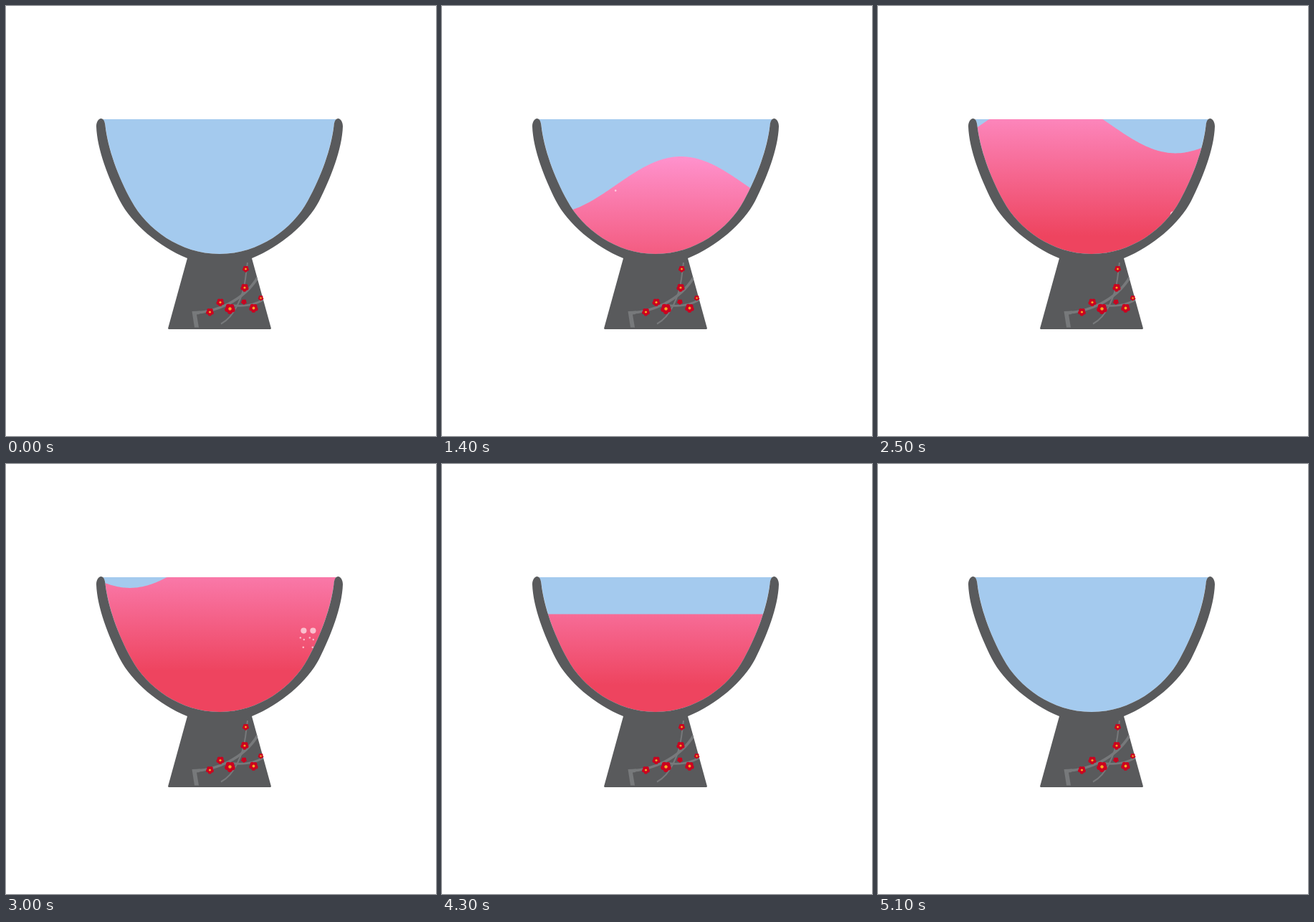
Write an HTML page with a canvas that moves like this. It is 600x600 px and loops after 5.2 s.

```html
<!DOCTYPE html>
<html lang="en">
<head>
<meta charset="utf-8">
<title>Filling bowl</title>
<style>
html, body { margin: 0; width: 100%; height: 100%; overflow: hidden; background: #fff; }
canvas { display: block; width: 600px; height: 600px; }
</style>
</head>
<body>
<canvas id="stage" width="600" height="600"></canvas>
<script>
const ctx = document.getElementById('stage').getContext('2d');
const LOOP = 5200, STEP = 100;
const RIM = 158, AMP = 39.7, HALF = 181, DEPTH = 195;
const GREY = '#595a5c', TWIG = '#77797b', RED = '#cb001f', GOLD = '#f6a823';

// Height of the wave crest: [step, y]
const RISE = [[2, 264], [7, 245], [8, 239.5], [13, 215], [19, 185], [25, 126], [31, 87], [36, 62]];

const WALL = 'C142 198 156 238 175 272 C196 311 243 346 298 346' +
  'C353 346 400 311 421 272 C440 238 454 198 ';
const inner = new Path2D('M135 157 L138 163 ' + WALL + '458 163 L461 157 Z');
const body = new Path2D(
  'M126 168 C126 162 129 157 132.5 157 C136 157 138 161 138.5 167 ' +
  WALL + '457.5 167' +
  'C458 161 460 157 463.5 157 C467 157 470 162 470 168' +
  'C469 200 453 240 437 272 C421 303 383 336 343 352' +
  'L370 450 L369 451 L227 451 L226 450 L253 352' +
  'C213 336 175 303 159 272 C143 240 127 200 126 168 Z');
const twigs = [
  ['M264 428 C292 427 331 412 351 379', 3.6],
  ['M300 443.5 C319 434 331 404 334 381 L337 358', 2],
  ['M311 417 C327 420 345 418 359 410', 3]
].map(([d, w]) => [new Path2D(d), w]);
const trunk = new Path2D('M259.5 426 L271 425.5 L270 430 L266 430.5 L269 448.5 L263 448.5 Z');

// x, y, radius, centre radius
const FLOWERS = [
  [334.5, 367, 4.6, 1.4], [333, 393, 5.6, 1.6], [299, 413.5, 5.5, 1.6],
  [312.5, 422.5, 7.3, 2.2], [284.5, 427, 5.4, 1.6], [345.5, 421.5, 6.2, 1.9],
  [332, 413, 3.8, 0], [355.5, 407.5, 3.8, 1.2]
];

function track(points, n) {
  if (n <= points[0][0]) return points[0][1];
  for (let i = 1; i < points.length; i++) {
    const [a, u] = points[i - 1], [b, v] = points[i];
    if (n <= b) return u + (v - u) * (n - a) / (b - a);
  }
  return points[points.length - 1][1];
}

function dot(x, y, r) {
  ctx.beginPath();
  ctx.arc(x, y, r, 0, Math.PI * 2);
  ctx.fill();
}

function bubble(x, y) {
  ctx.fillStyle = 'rgba(255,255,255,.62)';
  dot(x, y, 4.1);
  dot(x - 4.6, y + 9.8, 1.2);
  dot(x + 0.4, y + 12.4, 1.2);
  dot(x - 0.6, y + 23.2, 1.3);
}

function flower([x, y, r, core]) {
  ctx.fillStyle = RED;
  for (let i = 0; i < 5; i++) {
    const a = i * Math.PI * 0.4 + 0.35;
    dot(x + Math.cos(a) * r * 0.55, y + Math.sin(a) * r * 0.55, r * 0.47);
  }
  ctx.fillStyle = GOLD;
  if (core) dot(x, y, core);
}

function surface(x, peakX, peakY) {
  const phase = Math.min(1, (x - peakX) / HALF);
  return peakY + AMP * (1 - Math.cos(phase * Math.PI));
}

function liquid(n) {
  if (n < 2 || n >= 51) return;
  const drop = Math.max(0, n - 40) * 17.15;
  const peakX = 190 + 23.9 * (n - 8);
  const peakY = track(RISE, n) + drop;

  ctx.save();
  ctx.beginPath();
  ctx.moveTo(120, 360);
  for (let x = 120; x <= 480; x += 2) {
    ctx.lineTo(x, drop ? RIM + drop : Math.max(RIM, surface(x, peakX, peakY)));
  }
  ctx.lineTo(480, 360);
  ctx.closePath();
  const fill = ctx.createLinearGradient(0, peakY, 0, peakY + DEPTH);
  fill.addColorStop(0, '#ff92cd');
  fill.addColorStop(1, '#ee445f');
  ctx.fillStyle = fill;
  ctx.fill();

  ctx.clip();
  if (n < 20) bubble(242.8, 304 - 11.6 * (n - 8));
  if (n >= 20 && !drop) {
    const k = Math.min(n, 36) - 36;
    const x = 419.6 + k * 0.7, y = 163 - k * 11.6;
    bubble(x, y);
    bubble(x + 13, y);
  }
  ctx.restore();
}

function draw(n) {
  ctx.fillStyle = '#fff';
  ctx.fillRect(0, 0, 600, 600);

  ctx.save();
  ctx.clip(inner);
  ctx.fillStyle = '#a4caee';
  ctx.fillRect(120, RIM, 360, 200);
  liquid(n);
  ctx.restore();

  ctx.fillStyle = GREY;
  ctx.fill(body);
  ctx.save();
  ctx.clip(body);
  ctx.strokeStyle = ctx.fillStyle = TWIG;
  for (const [path, width] of twigs) {
    ctx.lineWidth = width;
    ctx.stroke(path);
  }
  ctx.fill(trunk);
  ctx.restore();
  FLOWERS.forEach(flower);
}

const start = performance.now();
function tick() {
  const t = (performance.now() - start) % LOOP;
  draw(Math.floor(t / STEP));
  requestAnimationFrame(tick);
}
tick();
</script>
</body>
</html>
```
